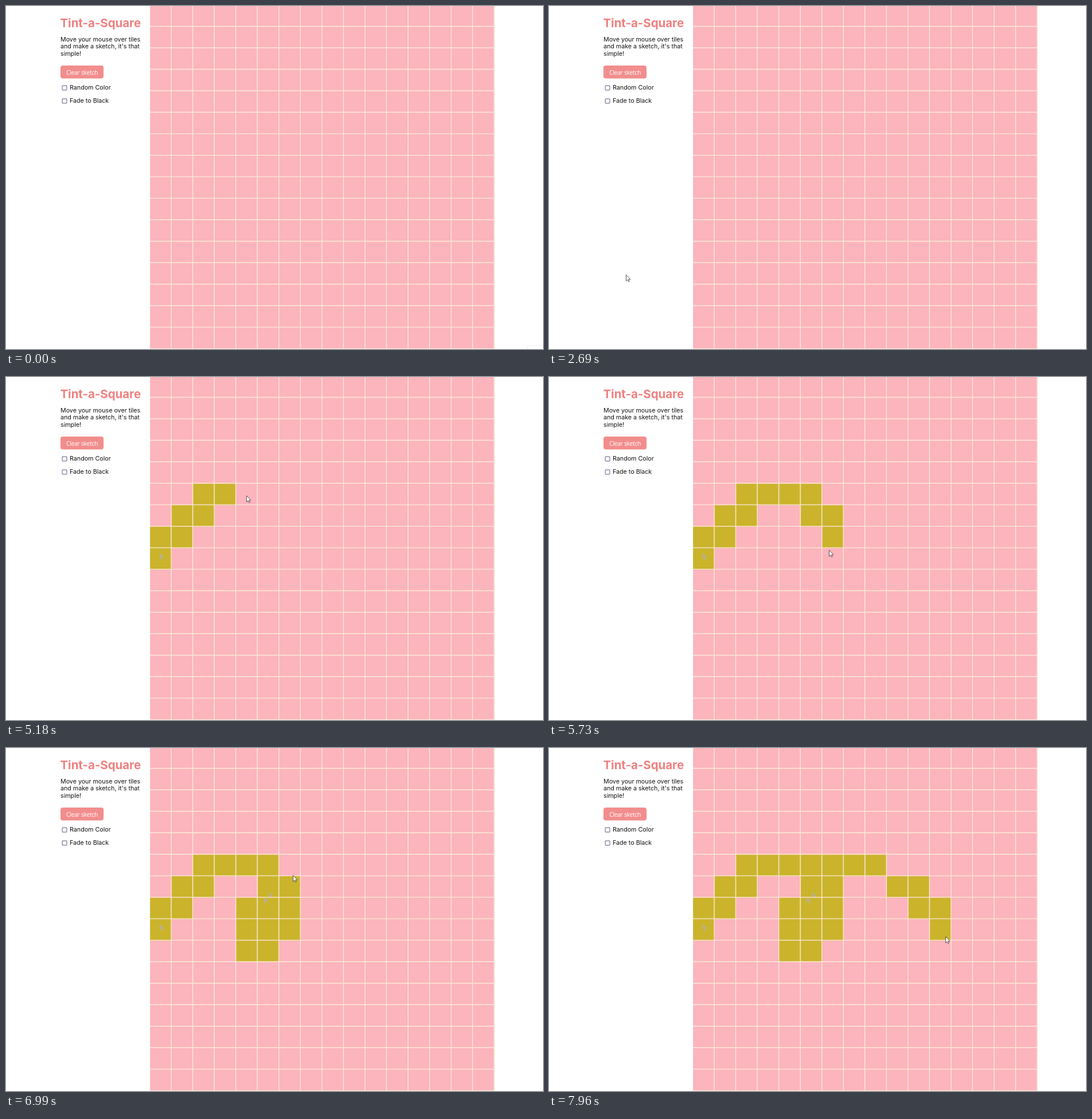
An HTML page that plays this animation: 936x599 px, repeating every 8000 ms.

```html
<!DOCTYPE html>
<html lang="en">
<head>
<meta charset="utf-8">
<title>Tile sketch</title>
<style>
html, body { margin: 0; width: 100%; height: 100%; overflow: hidden; background: #fff; }
svg { display: block; width: 936px; height: 599px; }
text { font-family: Inter, sans-serif; font-size: 10.7px; fill: #111; }
.title { font-size: 20.4px; font-weight: 700; fill: #f08080; }
.button { font-family: "Open Sans", sans-serif; font-size: 10.4px; letter-spacing: -.3px; fill: #fff; }
.check { fill: #fff; stroke: #777c9c; stroke-width: 1.2; }
</style>
</head>
<body>
<svg viewBox="0 0 936 599">
  <defs><path id="arrow" d="M.4 .4V11.3L2.9 9 4.6 12.5 6.1 11.8 4.5 8.3H7.8Z"/></defs>
  <text class="title" x="94.5" y="37">Tint-a-Square</text>
  <text x="95" y="62">Move your mouse over tiles</text>
  <text x="95" y="74.3">and make a sketch, it's that</text>
  <text x="95" y="86.5">simple!</text>
  <rect x="95" y="104" width="75" height="22.5" rx="4" fill="#f28d8d"/>
  <text class="button" x="105" y="119.5">Clear sketch</text>
  <rect class="check" x="98.1" y="139.1" width="7.8" height="7.8" rx=".8"/>
  <text x="111" y="146">Random Color</text>
  <rect class="check" x="98.1" y="162.1" width="7.8" height="7.8" rx=".8"/>
  <text x="111" y="169">Fade to Black</text>

  <rect x="251.1" y="0" width="600.4" height="598.5" fill="#fcb4bd"/>
  <g id="tiles" fill="#cbb42c"></g>
  <g id="ghosts" fill="#b9b09a" opacity=".9"></g>
  <path id="lines" fill="none" stroke="#faebd7" stroke-width="1.4"/>
  <g id="popup" fill="none" stroke="#f0f0f0">
    <path d="M909 593.5H936"/>
    <path id="edge" d="M908.5 593V599"/>
  </g>
  <use id="cursor" href="#arrow" fill="#fff" stroke="#333" stroke-width=".8" stroke-linejoin="round"/>
</svg>
<script>
const LOOP = 8000, STEP = 69.6, ORIGIN = 5175;
const CELL = 37.53, LEFT = 251.1, TOP = -1.4, COUNT = 16;
const $ = id => document.getElementById(id);

// Key points of the mouse gesture: tick, x, y
const keys = [
  [-49, 156, 615], [-44, 138, 491], [-40, 138, 491], [-36, 134, 469],
  [-31, 147, 437], [-28, 161, 447], [-25, 161, 447], [-15, 252, 329],
  [-8, 307, 256], [-2, 378, 207], [0, 419, 207], [4, 483, 240],
  [7, 488, 302], [11, 446, 347], [17, 419, 300], [20, 440, 268],
  [26, 500, 222], [31, 575, 212], [33, 600, 226], [35, 633, 239], [40, 691, 329]
];
const first = keys[0][0], last = keys[keys.length - 1][0];

// Speed through a key; zero where the mouse rests
function slope(i, axis) {
  const a = keys[Math.max(i - 1, 0)], b = keys[i], c = keys[Math.min(i + 1, keys.length - 1)];
  const rests = (p, q) => p !== q && p[1] === q[1] && p[2] === q[2];
  return rests(a, b) || rests(b, c) ? 0 : (c[axis] - a[axis]) / (c[0] - a[0]);
}

// Smooth cubic curve through the keys
function cursorAt(tick) {
  const t = Math.min(Math.max(tick, first), last);
  const i = Math.max(1, keys.findIndex(k => k[0] >= t));
  const a = keys[i - 1], b = keys[i], span = b[0] - a[0];
  const u = (t - a[0]) / span, v = 1 - u;
  return [1, 2].map(axis =>
    a[axis] + (b[axis] - a[axis]) * u * u * (3 - 2 * u) +
    span * u * v * (slope(i - 1, axis) * v - slope(i, axis) * u));
}

function add(parent, tag, attrs) {
  const el = document.createElementNS("http://www.w3.org/2000/svg", tag);
  for (const name in attrs) el.setAttribute(name, attrs[name]);
  return $(parent).appendChild(el);
}

let d = "";
for (let i = 1; i <= COUNT; i++) {
  const x = LEFT + i * CELL - .7, y = TOP + i * CELL - .7;
  d += `M${x} 0V598.5M${LEFT} ${y}H${LEFT + COUNT * CELL}`;
}
$("lines").setAttribute("d", d);

// A tile is coloured one tick after the cursor enters it
const marks = [], seen = new Set();
for (let tick = first; tick < last; tick++) {
  const [x, y] = cursorAt(tick);
  const col = Math.floor((x - LEFT) / CELL), row = Math.floor((y - TOP) / CELL);
  const id = col + "," + row;
  if (col < 0 || seen.has(id)) continue;
  seen.add(id);
  const el = add("tiles", "rect", {
    x: LEFT + col * CELL, y: TOP + row * CELL, width: CELL, height: CELL
  });
  marks.push({ el, from: tick + 1 });
}

// Faint prints the cursor leaves behind
for (const tick of [-13, 21, 22]) {
  const [x, y] = cursorAt(tick);
  marks.push({ el: add("ghosts", "use", { href: "#arrow", x, y }), from: tick + 1 });
}

function show(el, on) {
  el.setAttribute("visibility", on ? "visible" : "hidden");
}

function render(t) {
  const tick = Math.floor((t - ORIGIN) / STEP);
  const [x, y] = cursorAt(tick);
  $("cursor").setAttribute("transform", `translate(${x} ${y})`);
  for (const m of marks) show(m.el, tick >= m.from);
  show($("edge"), t < 70);
  const fade = t < 590 ? 0 : Math.floor((t - 590) / 68 + 1) / 6;
  $("popup").setAttribute("opacity", Math.max(0, 1 - fade));
}

function frame() {
  render(performance.now() % LOOP);
  requestAnimationFrame(frame);
}
frame();
</script>
</body>
</html>
```
